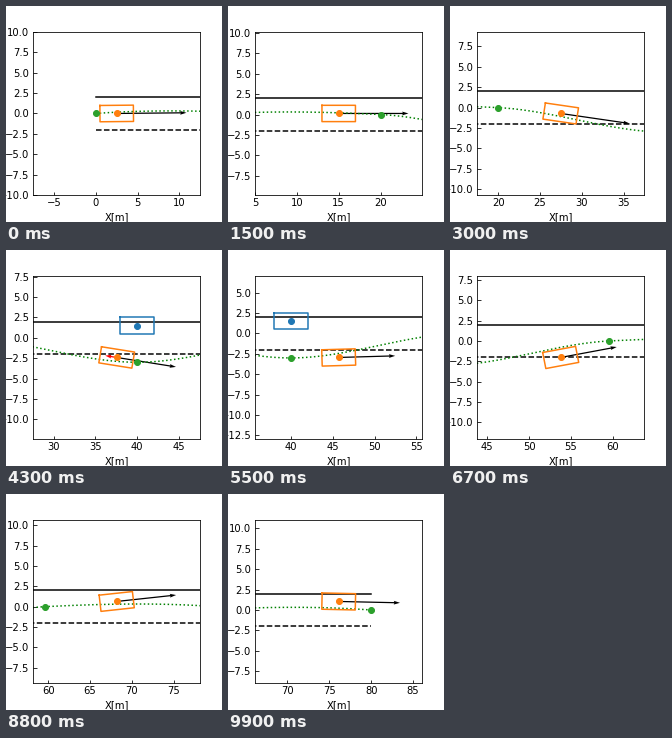
These frames come from a looping animation (216 px wide and 216 px high, 10000 ms). A matplotlib script:

```python
import matplotlib.pyplot as plt
import numpy as np
from matplotlib.animation import FuncAnimation
from matplotlib.ticker import MultipleLocator

FRAMES, DT = 100, 0.1
HALF_VIEW = 10


def hermite(x, xs, ys, slopes):
    """Piecewise cubic through (xs, ys) with the given slopes."""
    i = np.clip(np.searchsorted(xs, x, side="right") - 1, 0, len(xs) - 2)
    h = xs[i + 1] - xs[i]
    u = (x - xs[i]) / h
    blend = u * u * (3 - 2 * u)
    return (ys[i] + (ys[i + 1] - ys[i]) * blend
            + h * slopes[i] * u * (1 - u) ** 2
            - h * slopes[i + 1] * u * u * (1 - u))


def akima_slopes(xs, ys):
    d = np.diff(ys) / np.diff(xs)
    d = np.r_[3 * d[0] - 2 * d[1], 2 * d[0] - d[1], d,
              2 * d[-1] - d[-2], 3 * d[-1] - 2 * d[-2]]
    w = np.abs(np.diff(d))
    return (w[2:] * d[1:-2] + w[:-2] * d[2:-1]) / (w[2:] + w[:-2])


# Reference path through the goals
goal_x = np.array([0, 20, 40, 59.6, 80])
goal_y = np.array([0, 0, -3, 0, 0.0])
path_x = np.linspace(0, 80, 401)
path_y = hermite(path_x, goal_x, goal_y, akima_slopes(goal_x, goal_y))

# Driven track: lateral position and slope along x
track_x = np.array([2.5, 15, 27.5, 37.5, 53.6, 68, 76])
track_y = np.array([0, 0.13, -0.72, -2.4, -2.06, 0.62, 1.05])
track_s = np.array([0.01, 0, -0.15, -0.165, 0.19, 0.113, -0.02])


def track(x):
    return hermite(x, track_x, track_y, track_s)


def drive():
    """Integrate speed along the track; rows of x, y, yaw, speed, accel."""
    accel = np.interp(np.arange(FRAMES), [28, 34, 43, 47, 58, 66, 99],
                      [0, -0.8, -1.4, -0.1, 0, 0.15, 0.17])
    x, v, rows = 2.5, 30 / 3.6, []
    for a in accel:
        yaw = np.arctan((track(x + 0.01) - track(x - 0.01)) / 0.02)
        rows.append((x, track(x), yaw, v, a))
        x += (v + a * DT / 2) * np.cos(yaw) * DT
        v += a * DT
    return rows


states = drive()

plt.rcParams.update({"font.family": "DejaVu Sans", "font.size": 10,
                     "xtick.direction": "in", "ytick.direction": "in"})
fig = plt.figure(figsize=(3, 3), dpi=72)
fig.subplots_adjust(left=0.125, right=0.9, bottom=0.125, top=0.88)
ax = fig.add_subplot()


def draw_car(x, y, yaw, color):
    c, s = np.cos(yaw), np.sin(yaw)
    lx = np.array([-2, 2, 2, -2, -2])
    ly = np.array([1, 1, -1, -1, 1])
    ax.plot(x + c * lx - s * ly, y + s * lx + c * ly, color=color)
    ax.plot(x, y, "o", color=color)


def draw_vector(x, y, yaw, size, color):
    ax.quiver(x, y, size * np.cos(yaw), size * np.sin(yaw), color=color,
              angles="xy", scale_units="xy", scale=1)


def update(k):
    x, y, yaw, v, a = states[k]
    ax.clear()
    ax.plot([0, 80], [2, 2], "k-")
    ax.plot([0, 80], [-2, -2], "k--")
    ax.plot(path_x, path_y, "g:")
    draw_car(40, 1.5, 0, "C0")
    draw_car(x, y, yaw, "C1")
    ax.plot(goal_x, goal_y, "o", color="C2")
    draw_vector(x, y, yaw, v, "k")
    draw_vector(x, y, yaw, a, "r")
    ax.set_xlim(x - HALF_VIEW, x + HALF_VIEW)
    ax.set_ylim(y - HALF_VIEW, y + HALF_VIEW)
    ax.xaxis.set_major_locator(MultipleLocator(5))
    ax.yaxis.set_major_locator(MultipleLocator(2.5))
    ax.set_xlabel("X[m]")
    return []


anim = FuncAnimation(fig, update, frames=FRAMES, init_func=lambda: [],
                     interval=100, repeat=True, repeat_delay=0)
plt.show()
```
